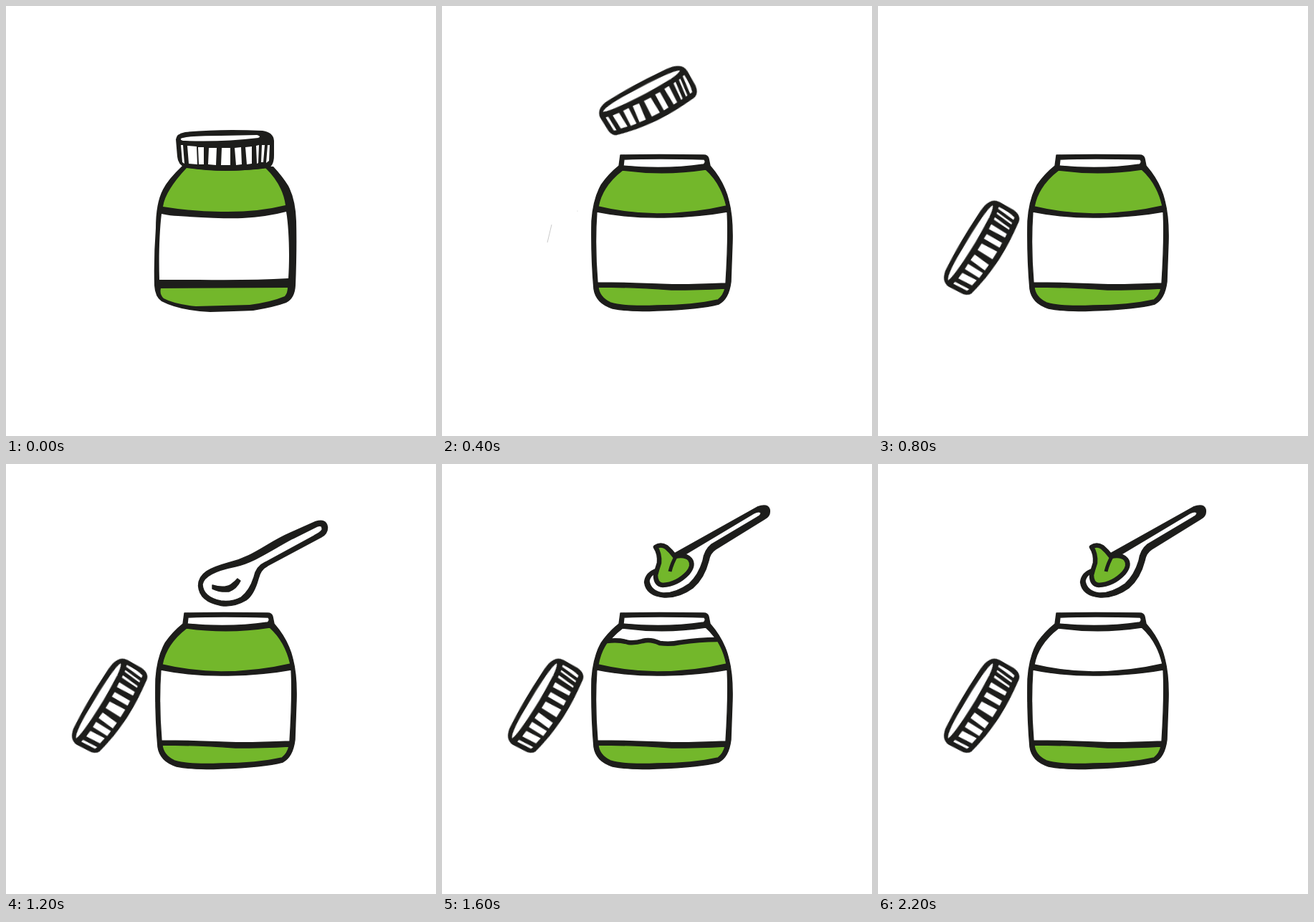
An HTML page that plays this animation: 600x600 px, repeating every 2.4 s.

```html
<!DOCTYPE html>
<html lang="en">
<head>
<meta charset="utf-8">
<title>Jar and spoon</title>
<style>
  html, body { margin: 0; width: 100%; height: 100%; overflow: hidden; background: #fff; }
  svg { display: block; width: 100%; height: 100%; }
  .ink { fill: #1d1d1b; }
  .white { fill: #fff; }
  .green { fill: #73b72b; }
  .bold { stroke: #1d1d1b; stroke-width: 1.4; stroke-linejoin: round; }
  .line { fill: none; stroke: #1d1d1b; stroke-width: 6.5; stroke-linecap: round; stroke-linejoin: round; }

  /* Every pose is held for a twelfth of the loop. */
  .step { animation: 2.4s step-end infinite; }
  #closed { animation-name: closed; }
  #open { animation-name: open; }
  #scratch { animation-name: scratch; }
  #full { animation-name: full; }
  #part { animation-name: part; }
  #lid { animation-name: lid; }
  #spoon { animation-name: spoon; transform-origin: 358.5px 139px; }
  #scoop { animation-name: scoop; }

  @keyframes closed {
    0% { visibility: visible; }
    8.333%, 100% { visibility: hidden; }
  }
  @keyframes open {
    0% { visibility: hidden; }
    8.333%, 100% { visibility: visible; }
  }
  @keyframes scratch {
    0% { visibility: hidden; }
    8.333% { visibility: visible; }
    33.333%, 100% { visibility: hidden; }
  }
  @keyframes full {
    0% { visibility: hidden; }
    8.333% { visibility: visible; }
    66.666%, 100% { visibility: hidden; }
  }
  @keyframes part {
    0% { visibility: hidden; }
    66.666% { visibility: visible; }
    91.666%, 100% { visibility: hidden; }
  }
  @keyframes lid {
    0% { visibility: hidden; transform: translate(306px, 173px); }
    8.333% { visibility: visible; transform: translate(306px, 173px); }
    16.666% { visibility: visible; transform: translate(287px, 133.5px) rotate(-27deg); }
    25% { visibility: visible; transform: translate(178.5px, 173.5px) rotate(-53deg); }
    33.333%, 100% { visibility: visible; transform: translate(144px, 338.5px) rotate(-58deg); }
  }
  @keyframes spoon {
    0% { visibility: hidden; transform: none; }
    41.666% { visibility: visible; transform: translate(15px, -51px); }
    50% { visibility: visible; transform: none; }
    58.333% { visibility: visible; transform: translate(0, 68px); }
    66.666% { visibility: hidden; transform: none; }
    75% { visibility: visible; transform: translate(11px, -18px) rotate(-4.5deg); }
    83.333% { visibility: visible; transform: translate(0, 68px); }
    91.666%, 100% { visibility: hidden; transform: none; }
  }
  @keyframes scoop {
    0% { visibility: hidden; }
    66.666% { visibility: visible; }
    75% { visibility: hidden; }
    91.666%, 100% { visibility: visible; }
  }
</style>
</head>
<body>
<svg viewBox="0 0 600 600">
  <g id="closed" class="step">
    <path class="ink" d="M246 223Q226 242 219 256Q209 275 209 310Q206 350 207 390Q208 406 217 412Q242 425 285 427Q320 426 345 425Q375 420 391 414Q403 408 404 390Q406 340 405 300Q404 270 394 251Q386 238 373 224Z"/>
    <path class="green" d="M252 226Q305 234 362 226Q386 249 390 278Q350 288 300 287Q255 286 219 280Q222 258 252 226Z"/>
    <path class="white" d="M217 290Q230 293 240 293Q300 297 330 296Q365 294 391 287C395 310 396 350 394 380Q340 383 270 382L214 382C213 350 214 315 217 290Z"/>
    <path class="green" d="M216 394L393 393Q393 400 389 405Q370 413 340 417L265 419Q235 416 220 408Q214 402 216 394Z"/>
    <path class="ink" d="M237 186Q238 178 250 176Q300 171 358 174Q373 176 374 188L374 208Q374 223 366 226Q305 234 250 225Q240 222 239 210Z"/>
    <path class="white" d="M244 185Q250 181 300 181L350 180Q357 182 352 184Q300 190 250 188Q243 188 244 185Z"/>
    <path class="white" d="M244 194L247 194L249 220L246 218ZM253 195L266 196L267 221L255 220ZM268 197L276 197L276 221L269 221ZM283 198L294 198L293 222L282 221ZM301 198L313 198L313 222L300 222ZM319 198L328 197L329 221L321 222ZM334 197L343 196L343 220L336 221ZM349 195L353 194L352 219L350 220ZM357 194L361 194L359 218L356 218ZM365 194L368 194L367 216L363 219Z"/>
  </g>

  <g id="scratch" class="step">
    <path d="M153 305L147 330" fill="none" stroke="#bbb" stroke-width=".8"/>
    <circle cx="189" cy="286" r=".6" fill="#ccc"/>
  </g>

  <g id="open" class="step bold">
    <path class="ink" d="M249 208Q300 207 365 208Q371 208 372 213L374 223Q394 246 400 272Q406 295 405 330L403 385Q400 409 386 416Q360 423 300 425Q262 427 238 422Q215 415 212 395Q208 350 209 300Q211 270 222 250Q232 235 247 223Z"/>
    <path class="white" d="M254 214Q300 212 366 214Q369 218 365 221Q310 229 253 223Z"/>
    <path class="white" d="M252 229Q310 237 368 228C385 243 393 262 397 279Q350 290 300 290Q255 289 218 280C222 258 235 242 252 229Z"/>
    <path class="white" d="M216 287Q260 296 310 295Q360 294 398 287C400 320 398 355 396 387Q330 390 300 388Q255 386 217 386C214 350 214 315 216 287Z"/>
    <path class="green" d="M218 392Q260 392 320 396Q360 396 395 394Q393 404 385 410Q350 418 300 418Q255 420 235 414Q219 406 218 392Z"/>
  </g>

  <g id="spoon" class="step bold">
    <path class="ink" fill-rule="evenodd" d="M268.5 170C268.5 152 285 145 310 138C345 130 365 110 395 97L432 80.5Q447 76 448.5 88Q449 97 440 102L365 142Q355 147 352 160Q346 182 335 190Q318 200 300 197.5Q270 192 268.5 170ZM274 168C276 155 295 148 320 143C345 138 370 120 400 104L434 87Q442 84 441 92Q438 96 430 100L362 137Q349 143 346 158Q340 177 328 186Q315 193 300 191Q275 186 274 168Z"/>
    <path class="ink" d="M288 169Q305 174 314 168Q320 164 323 160L327 163Q322 174 311 178Q298 179 288 174Z"/>
  </g>

  <!-- Contents hide the dipped end of the spoon. -->
  <path id="full" class="step bold green" d="M252 229Q310 237 368 228C385 243 393 262 397 279Q350 290 300 290Q255 289 218 280C222 258 235 242 252 229Z"/>
  <g id="part" class="step bold">
    <path class="green" d="M231 248Q248 245 260 249Q270 250 280 247Q291 244 304 250Q318 252 332 249Q360 245 384 246Q393 260 397 279Q350 290 300 290Q255 289 218 280Q221 262 231 248Z"/>
    <path class="line" d="M230 247Q248 245 260 249Q270 250 280 247Q291 244 304 250Q318 252 332 249Q360 245 383 245"/>
  </g>

  <g id="scoop" class="step bold">
    <path class="ink" d="M282.5 165Q284 151 300 146L322 126L440 60Q454 55 457 63Q459 72 450 77L382 119Q374 124 372 135Q366 159 350 173Q331 187 310 186Q285 184 282.5 165Z"/>
    <path class="white" d="M289 163Q291 155 298 152L338 127L435 69Q442 65 445 68Q445 72 440 74L376 112Q366 120 364 135Q358 155 345 167Q325 181 308 180Q291 177 289 163Z"/>
    <path class="line" style="fill:#73b72b" d="M298 116Q305 111 313 116Q320 122 325 129Q340 126 346 133Q352 141 343 152Q328 168 308 169Q298 168 298 155Q300 147 303 138Q304 125 298 116Z"/>
    <path class="line" style="stroke-width:5;stroke-linecap:butt" d="M327 128Q321 138 318 150"/>
  </g>

  <g id="lid" class="step bold">
    <g transform="translate(-306 -173)">
      <path class="ink" d="M237.5 162Q239 150 255 147.5Q300 143 350 145Q373 146 374 160L375 183Q374 196 365 197Q330 202 305 201.5Q270 200 246 194Q239 191 239 180Z"/>
      <path class="white" d="M243 157Q250 150 300 150Q355 149 367 154Q365 158 350 160Q300 164 260 161Q245 160 243 157Z"/>
      <path class="white" d="M243 165L248 166L250 190L245 188ZM253 167L264 168L266 192L255 190ZM269 168L279 168L279 194L269 193ZM284 168L295 169L293 195L282 194ZM301 169L313 169L315 195L301 195ZM319 168L328 168L329 194L320 195ZM334 167L343 166L343 193L336 194ZM349 166L354 165L352 192L348 193ZM358 165L362 164L360 191L356 192ZM365 163L369 162Q371 180 368 190L363 191Z"/>
    </g>
  </g>
</svg>
</body>
</html>
```
